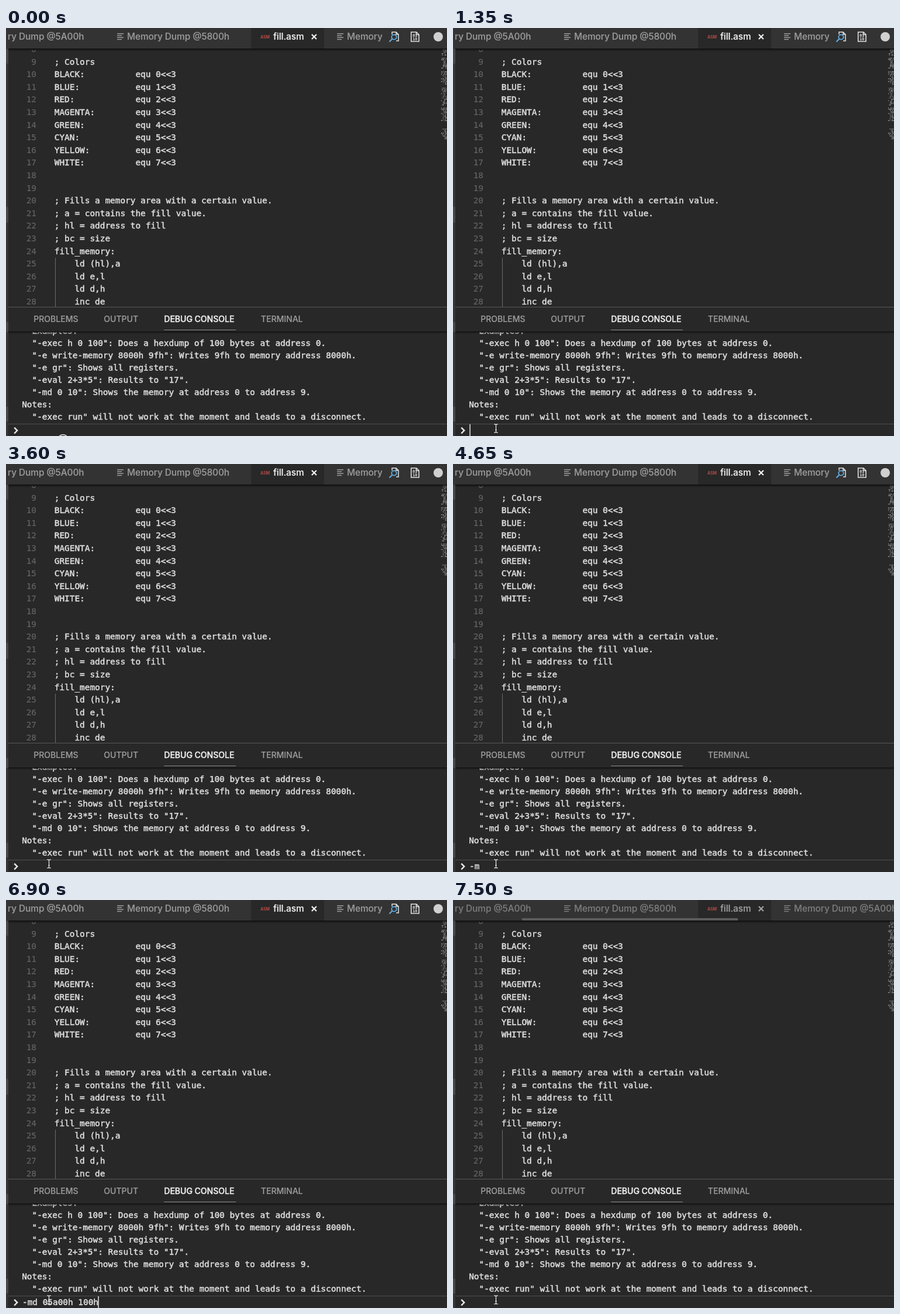
These frames come from a looping animation (754x698 px, 8 s). An HTML page:

```html
<!DOCTYPE html>
<html lang="en">
<head>
<meta charset="utf-8">
<title>Debug console</title>
<style>
  html, body { margin: 0; width: 100%; height: 100%; overflow: hidden; background: #282828; }
  svg { display: block; width: 754px; height: 698px; }
  text { white-space: pre; }
  .code { font: 14.4px "DejaVu Sans Mono", monospace; fill: #dedede; stroke: #dedede; stroke-width: .5px; }
  .num { fill: #646464; stroke: #646464; stroke-width: .15px; text-anchor: end; }
  .tab { font: 500 15.3px Inter, sans-serif; fill: var(--idle); stroke: var(--idle); stroke-width: .15px; }
  .panel { font: 500 14px Inter, sans-serif; fill: #9c9c9c; stroke: #9c9c9c; stroke-width: .15px; }
  .panel .current { fill: #f0f0f0; stroke: #f0f0f0; stroke-width: .4px; }
  .on { fill: var(--active); stroke: var(--active); }
  .asm { font: 600 7px Inter, sans-serif; fill: #c2504a; }
  .bits { font: 700 6.5px "DejaVu Sans Mono", monospace; fill: #e6e6e6; }
  #stage { --idle: #9b9b9b; --active: #f4f4f4; }
  #stage.blur { --idle: #7c7c7c; --active: #a2a2a2; }
</style>
</head>
<body>
<svg id="stage" viewBox="0 0 754 698">
  <defs>
    <clipPath id="tabClip"><rect x="4" width="750" height="35"/></clipPath>
    <clipPath id="nextClip"><rect id="nextRect" x="544" width="99" height="35"/></clipPath>
    <clipPath id="editClip"><rect x="4" y="37" width="750" height="440"/></clipPath>
    <clipPath id="logClip"><rect x="4" y="520" width="750" height="157"/></clipPath>
    <linearGradient id="shade" x2="0" y2="1">
      <stop stop-color="#101010"/><stop offset="1" stop-color="#101010" stop-opacity="0"/>
    </linearGradient>
    <path id="lines" d="M0 .8H11M0 4H8M0 7.2H11M0 10.4H8" stroke="var(--idle)" stroke-width="1.5"/>
  </defs>

  <rect width="754" height="698" fill="#282828"/>
  <rect width="754" height="35" fill="#333"/>
  <rect x="419" width="125" height="35" fill="#282828"/>

  <g clip-path="url(#tabClip)">
    <text class="tab" x="133.5" y="20" text-anchor="end">Memory Dump @5A00h</text>
    <use href="#lines" x="190" y="9"/>
    <text class="tab" x="207" y="20">Memory Dump @5800h</text>
    <text class="asm" x="435" y="17.5">ASM</text>
    <text class="tab on" x="457" y="20">fill.asm</text>
    <path d="M522.8 11l8 8m0-8l-8 8" stroke="var(--active)" stroke-width="2.2"/>
    <use href="#lines" x="566" y="9"/>
    <text class="tab" x="583" y="20" clip-path="url(#nextClip)">Memory Dump @5A00h</text>
  </g>

  <g id="actions" fill="none">
    <path d="M660 11V7h7l4 4v11h-4M667 7v4h4" stroke="#e2e2e2" stroke-width="1.5"/>
    <circle cx="663.5" cy="15.5" r="4.2" stroke="#62aee0" stroke-width="1.8"/>
    <path d="M660.5 18.5l-5 5" stroke="#62aee0" stroke-width="2.2"/>
    <path d="M692.7 7h9l4.3 4.3V23h-13.3zM701.5 7v4.5h4.5" stroke="#e2e2e2" stroke-width="1.6"/>
    <text class="bits" x="695.3" y="15.2">01</text>
    <text class="bits" x="695.3" y="21.3">10</text>
    <circle cx="739" cy="15" r="8" fill="#d0d0d0"/>
  </g>
  <rect id="tabScroll" x="118" y="31" width="369" height="4" fill="#5c5c5c"/>

  <g id="editor" clip-path="url(#editClip)">
    <path d="M84.5 393V477" stroke="#6c6c6c"/>
  </g>
  <g id="minimap" fill="#d0d0d0"></g>
  <rect x="4" y="35" width="750" height="5" fill="url(#shade)"/>

  <path d="M4 477.5H754" stroke="#585858"/>
  <g class="panel">
    <text x="47.3" y="503">PROBLEMS</text>
    <text x="167.3" y="503">OUTPUT</text>
    <text class="current" x="270.3" y="503">DEBUG CONSOLE</text>
    <text x="435.8" y="503">TERMINAL</text>
  </g>
  <path d="M270 516.5H393" stroke="#8a8a8a"/>
  <g id="log" clip-path="url(#logClip)"></g>
  <rect x="4" y="519" width="750" height="4" fill="url(#shade)"/>

  <path d="M4 677.5H754" stroke="#505050"/>
  <path d="M14.2 683.6l5 5-5 5" fill="none" stroke="#e8e8e8" stroke-width="2.4"/>
  <text id="input" class="code" x="28" y="692.6"></text>
  <rect id="caret" y="678" width="1.5" height="20" fill="#e6e6e6"/>

  <rect width="4" height="698" fill="#353535"/>
  <path d="M0 36h4v25H0zM0 306h4v27H0zM0 503h4v17H0zM0 648h4v25H0z" fill="#484848"/>

  <circle id="ring" r="9.7" fill="none" stroke="#eee" stroke-width="1.4"/>
  <path id="arrow" d="M.7 1V14.6L3.9 11.6 6.2 16.8 8.6 15.8 6.3 10.7H10.8Z" fill="#111" stroke="#f2f2f2" stroke-width="1.1"/>
  <path id="beam" d="M.3.8H2.3L3.5 2 4.7.8H6.7M3.5 2V14M.3 15.2H2.3L3.5 14 4.7 15.2H6.7M2.2 10.5H4.8" fill="none" stroke="#f0f0f0" stroke-width="1.2"/>
</svg>

<script>
const $ = id => document.getElementById(id);
const LOOP = 8000, CHAR = 14.4 * 0.602;

function add(parent, tag, attrs, text) {
  const el = document.createElementNS("http://www.w3.org/2000/svg", tag);
  for (const key in attrs) el.setAttribute(key, attrs[key]);
  if (text) el.textContent = text;
  $(parent).append(el);
}

const colors = ["BLACK", "BLUE", "RED", "MAGENTA", "GREEN", "CYAN", "YELLOW", "WHITE"];
const source = [
  "", "; Colors",
  ...colors.map((name, i) => (name + ":").padEnd(16) + `equ ${i}<<3`),
  "", "",
  "; Fills a memory area with a certain value.",
  "; a = contains the fill value.",
  "; hl = address to fill",
  "; bc = size",
  "fill_memory:",
  "    ld (hl),a", "    ld e,l", "    ld d,h", "    inc de"
];
source.forEach((line, i) => {
  const y = 41 + i * 21.6;
  add("editor", "text", { class: "code num", x: 52, y }, String(i + 8));
  add("editor", "text", { class: "code", x: 82.8, y }, line);
});

const log = [
  "  Examples:",
  '  "-exec h 0 100": Does a hexdump of 100 bytes at address 0.',
  '  "-e write-memory 8000h 9fh": Writes 9fh to memory address 8000h.',
  '  "-e gr": Shows all registers.',
  '  "-eval 2+3*5": Results to "17".',
  '  "-md 0 10": Shows the memory at address 0 to address 9.',
  "Notes:",
  '  "-exec run" will not work at the moment and leads to a disconnect.'
];
log.forEach((line, i) =>
  add("log", "text", { class: "code", x: 27.2, y: 522.6 + i * 21 }, line));

// Seeded specks stand for the tiny code overview.
let seed = 11;
const rand = () => (seed = seed * 16807 % 2147483647) / 2147483647;
for (const [top, end] of [[36, 46], [51, 69], [74, 97], [102, 132], [136, 160], [172, 190]]) {
  for (let y = top; y < end; y += 2.4) {
    const indent = rand() < .45 ? 3 : 0;
    for (let x = 744 + indent; x < 754; x += 1.2) {
      if (rand() < .65) add("minimap", "rect", { x, y, width: 1.2, height: 1.5, opacity: .3 + rand() * .5 });
    }
  }
}

// Each step: start time, pointer kind, x, y
const pointer = [
  [0, "none", 0, 0], [150, "arrow", 84, 695], [300, "arrow", 75, 684],
  [600, "arrow", 75, 683], [750, "arrow", 74, 683], [1050, "beam", 73, 676],
  [1200, "beam", 72, 677], [1350, "beam", 70, 677], [1500, "beam", 80, 679],
  [1650, "beam", 82, 681], [1800, "beam", 70, 676]
];
const rings = [[0, 97.5, 705.5], [150], [1050, 76.5, 683.5], [1200]];
const typed = [[0, ""], [4200, "-m"], [4950, "-md 05a00h 100h"], [7350, ""]];
const blinks = [1050, 1500, 2100, 2550, 3000, 3600, 4050, 4650, 4950, 5400, 6000, 6450, 6900, 7500];

const stepAt = (steps, t) => steps.filter(s => s[0] <= t).pop();
const show = (id, on) => $(id).setAttribute("visibility", on ? "visible" : "hidden");
const move = (id, x, y) => $(id).setAttribute("transform", `translate(${x} ${y})`);

function draw(t) {
  const [, kind, x, y] = stepAt(pointer, t);
  for (const id of ["arrow", "beam"]) {
    show(id, id === kind);
    move(id, x, y);
  }

  const [, cx, cy] = stepAt(rings, t);
  show("ring", cx !== undefined);
  if (cx !== undefined) move("ring", cx, cy);

  const text = stepAt(typed, t)[1];
  $("input").textContent = text;
  $("caret").setAttribute("x", text ? 27.2 + text.length * CHAR : 28.3);
  show("caret", blinks.filter(b => b <= t).length % 2);

  const blurred = t >= 7500;
  $("stage").classList.toggle("blur", blurred);
  show("actions", !blurred);
  show("tabScroll", blurred);
  $("nextRect").setAttribute("width", blurred ? 210 : 99);
}

const start = performance.now();
function tick() {
  draw((performance.now() - start) % LOOP);
  requestAnimationFrame(tick);
}
tick();
</script>
</body>
</html>
```
